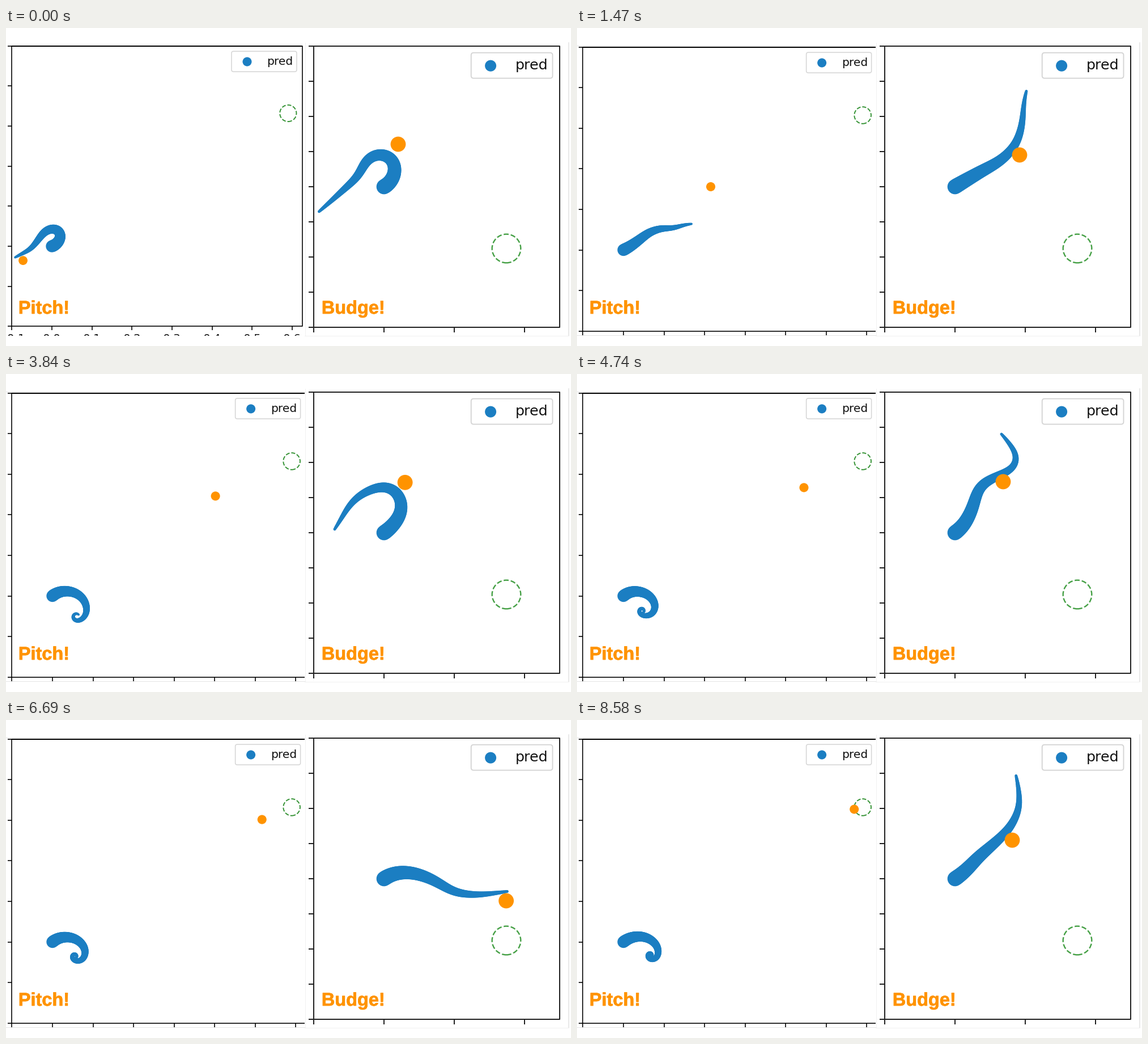
Animation, 997 px wide and 561 px high, one loop 8640 ms. Source, as a matplotlib script:

```python
import numpy as np
import matplotlib.pyplot as plt
from matplotlib.animation import FuncAnimation
from matplotlib.collections import LineCollection
from matplotlib.patches import Circle, Ellipse, FancyBboxPatch, Rectangle
from matplotlib.patheffects import withStroke

W, H, DPI = 997, 561, 64
PT = 72 / DPI
STEP, FRAMES = 30, 288
N = 72                      # segments per arm
ARM = 1.835                 # arm length in axis units
RIGHT_LOOP = 3630           # the right clip restarts, ms
RELEASE = 700               # the thrown ball leaves the arm, ms
BLUE, ORANGE = "#1b7ec2", "#ff9300"

fig = plt.figure(figsize=(W / DPI, H / DPI), dpi=DPI, facecolor="white")
ax = fig.add_axes([0, 0, 1, 1])
ax.set_xlim(0, W)
ax.set_ylim(H, 0)
ax.axis("off")
left_clip = Rectangle((0, 543), 527, -517, transform=ax.transData)


def hermite(t, T, V, mono=False):
    """Cubic interpolation of rows V at knots T, optionally without overshoot."""
    T, V = np.asarray(T, float), np.asarray(V, float)
    if mono:
        d = np.diff(V, axis=0) / np.diff(T)[:, None]
        a, b = d[:-1], d[1:]
        same = a * b > 0
        mid = np.where(same, 2 * a * b / np.where(same, a + b, 1), 0)
        m = np.vstack([d[:1], mid, d[-1:]])
    else:
        m = np.gradient(V, T, axis=0)
    i = np.clip(np.searchsorted(T, t, "right") - 1, 0, len(T) - 2)
    h = (T[i + 1] - T[i])[:, None]
    u = np.clip((t - T[i])[:, None] / h, 0, 1)
    return ((1 + 2 * u) * (1 - u) ** 2 * V[i] + u * (1 - u) ** 2 * h * m[i]
            + u * u * (3 - 2 * u) * V[i + 1] + u * u * (u - 1) * h * m[i + 1])


def arm_track(times, poses):
    """Arm centre lines over time; a pose is the heading at even joints, base to tip."""
    joints = hermite(times, list(poses), list(poses.values()), True)
    along = (np.arange(N) + 0.5) / N
    ang = np.radians(hermite(along, np.linspace(0, 1, joints.shape[1]), joints.T)).T
    steps = np.stack([np.cos(ang), -np.sin(ang)], axis=2) * ARM / N
    return np.concatenate([np.zeros((len(ang), 1, 2)), np.cumsum(steps, axis=1)], axis=1)


class Panel:
    def __init__(self, origin, unit, xmax, top, bottom, ystep, scale, goal, goal_r,
                 ink="black", green="#339233", clip=None, labels=False):
        self.origin, self.unit, self.scale = np.array(origin), unit, scale
        self.clip, self.parts = clip, []
        (x0, y0), (x1, y1) = self.at((-1, -top)), self.at((xmax, bottom))
        tick = 7 * scale
        lines = [[(x0, y0), (x1, y0), (x1, y1), (x0, y1), (x0, y0), (x1, y0)]]
        lines += [[(x0 - tick, y), (x0, y)]
                  for y in np.arange(y0, y1 + 1, ystep * unit)]
        xticks = np.arange(x0, x1, unit)
        lines += [[(x, y1), (x, y1 + tick)] for x in xticks]
        self.add(LineCollection(lines, colors=ink, linewidths=1.6 * scale * PT))
        if labels:
            for k, x in enumerate(xticks):
                name = f"{(k - 1) / 10:.1f}".replace("-", "\u2212")
                self.text(x, y1 + 28, name, 20, ha="center")
        # negative height: the dashes start at the bottom, counter-clockwise
        size = 2 * goal_r * unit
        self.add(Ellipse(self.at(goal), size, -size, fill=False, ec=green,
                         lw=1.9 * scale * PT, ls="--"))
        self.legend(x1 - 10 * scale, y0 + 9.3 * scale)

    def at(self, p):
        return self.origin + np.asarray(p) * self.unit

    def add(self, artist):
        ax.add_artist(artist)
        if self.clip:
            artist.set_clip_path(self.clip)
        self.parts.append(artist)

    def text(self, x, y, s, px, **kw):
        t = ax.text(x, y, s, fontsize=px * PT, family="DejaVu Sans",
                    color="#111111", va="baseline", clip_on=True, **kw)
        if self.clip:
            t.set_clip_path(self.clip)
        self.parts.append(t)

    def legend(self, right, top):
        s = self.scale
        x = right - 115 * s
        self.add(FancyBboxPatch((x, top), 115 * s, 36 * s, fc="white", ec="#d4d4d4",
                                lw=1.5 * s * PT,
                                boxstyle=f"round,pad=0,rounding_size={3.5 * s}"))
        self.add(Circle((x + 27.5 * s, top + 18.4 * s), 8 * s, color=BLUE, lw=0))
        self.text(x + 62.6 * s, top + 23.5 * s, "pred", 20.3 * s)

    def show(self, on):
        for p in self.parts:
            p.set_visible(on)


class Actor:
    """An arm and the ball it moves."""

    def __init__(self, scale, ball_z):
        taper = (1 - np.linspace(0, 1, N)) ** 0.88
        self.arm = LineCollection([], colors=BLUE, capstyle="round", zorder=5,
                                  linewidths=2 * scale * (2 + 8.7 * taper) * PT)
        self.ball = Circle((0, 0), 1, color=ORANGE, lw=0, zorder=ball_z)
        ax.add_collection(self.arm, autolim=False)
        ax.add_patch(self.ball)

    def pose(self, panel, curve, ball, radius):
        p = panel.at(curve)
        self.arm.set_segments(np.stack([p[:-1], p[1:]], axis=1))
        self.ball.center = panel.at(ball)
        self.ball.radius = radius * panel.unit


# faint borders of the two clips
ax.plot([993, 993], [26, 543], color="#e2e2e2", lw=1.5 * PT)
ax.plot([527.5, 527.5], [26, 543], color="#f1f1f1", lw=PT)
ax.plot([527, 993], [542.5, 542.5], color="#f1f1f1", lw=PT)

pitch = dict(xmax=6.256, top=5, bottom=2, ystep=1, scale=1,
             goal=(5.9, -3.32), goal_r=0.207, clip=left_clip)
first = Panel((81, 385), 70.65, labels=True, **pitch)
main = Panel((82, 391.5), 71.55, **pitch)
for y in (30.5, 542):
    main.parts += ax.plot([0, 527], [y, y], color="#e4e4e4", lw=PT)
budge = Panel((667, 280), 124, xmax=2.5, top=2, bottom=2, ystep=0.5, scale=1.25,
              goal=(1.742, 0.879), goal_r=0.204, ink="#222222", green="#45a045")

for x, word in ((21.8, "Pitch!"), (556.8, "Budge!")):
    ax.text(x, 504, word, fontsize=32.5 * PT, family="Liberation Sans",
            weight="bold", color=ORANGE, va="baseline",
            path_effects=[withStroke(linewidth=0.7 * PT, foreground=ORANGE)])

time = np.minimum(np.arange(FRAMES), FRAMES - 2) * STEP
phase = time % RIGHT_LOOP

# headings in degrees, keyed by time in ms
left_arm = arm_track(time, {
    0: (18, 78, 175, 226, 231, 210, 208),           # coiled
    RELEASE: (44, 55, 58, 55, 55, 65, 74),          # throw
    1470: (26, 35, 36, 19, 3, 15, 6),               # follow through
    2940: (37, 11, -16, -39, -52, -110, -215),      # droop
    4740: (40, 3, -30, -75, -150, -250, -540),      # roll up
    8580: (38, 10, -21, -60, -130, -290, -640),
})
right_arm = arm_track(phase, {
    0: (29, 91, 176, 238, 224, 222, 221),           # hooked
    330: (36, 55, 100, 159, 206, 241, 243),         # arch
    1110: (36, 63, 70, 30, 35, 114, 133),
    1320: (34, 46, 41, 46, 65, 92, 103),            # lean on the ball
    1470: (31, 30, 30, 48, 73, 85, 76),
    2130: (38, 2, -13, 1, 51, 65, 8),
    2940: (35, 1, -20, -29, -3, 12, 10),            # flat
    RIGHT_LOOP: (27, -5, -24, -31, -28, -27, -22),  # press down
})


def glide(ms):
    """Thrown ball slowing under drag along a straight line."""
    d = 156.3 * np.log(1 + 0.57 * (np.maximum(ms, RELEASE) - 1470) / 1000)
    return np.stack([236 + d, 280 - 0.484 * d], axis=-1)


carry = hermite(time, [0, 200, 400, 570, RELEASE],
                [(30.4, 417), (40, 381), (77, 353), (117, 337), glide(RELEASE)])
left_ball = np.where(time[:, None] < RELEASE, carry, glide(time))
left_ball = (left_ball - main.origin) / main.unit

right_ball = hermite(phase, [0, 330, 1110, 1320, 1470, 2130, 2940, RIGHT_LOOP],
                     [(692, 205), (711, 185), (752, 190), (768, 212), (781, 224),
                      (836, 257), (880, 308), (885, 380)])
right_ball = (right_ball - budge.origin) / budge.unit

thrower, pusher = Actor(1, ball_z=4), Actor(1.25, ball_z=6)


def draw(i):
    first.show(i == 0)
    main.show(i > 0)
    thrower.pose(main if i else first, left_arm[i], left_ball[i], 0.112)
    pusher.pose(budge, right_arm[i], right_ball[i], 0.108)
    return []


anim = FuncAnimation(fig, draw, frames=FRAMES, interval=STEP,
                     init_func=lambda: draw(0), repeat=True, repeat_delay=0)
plt.show()
```
